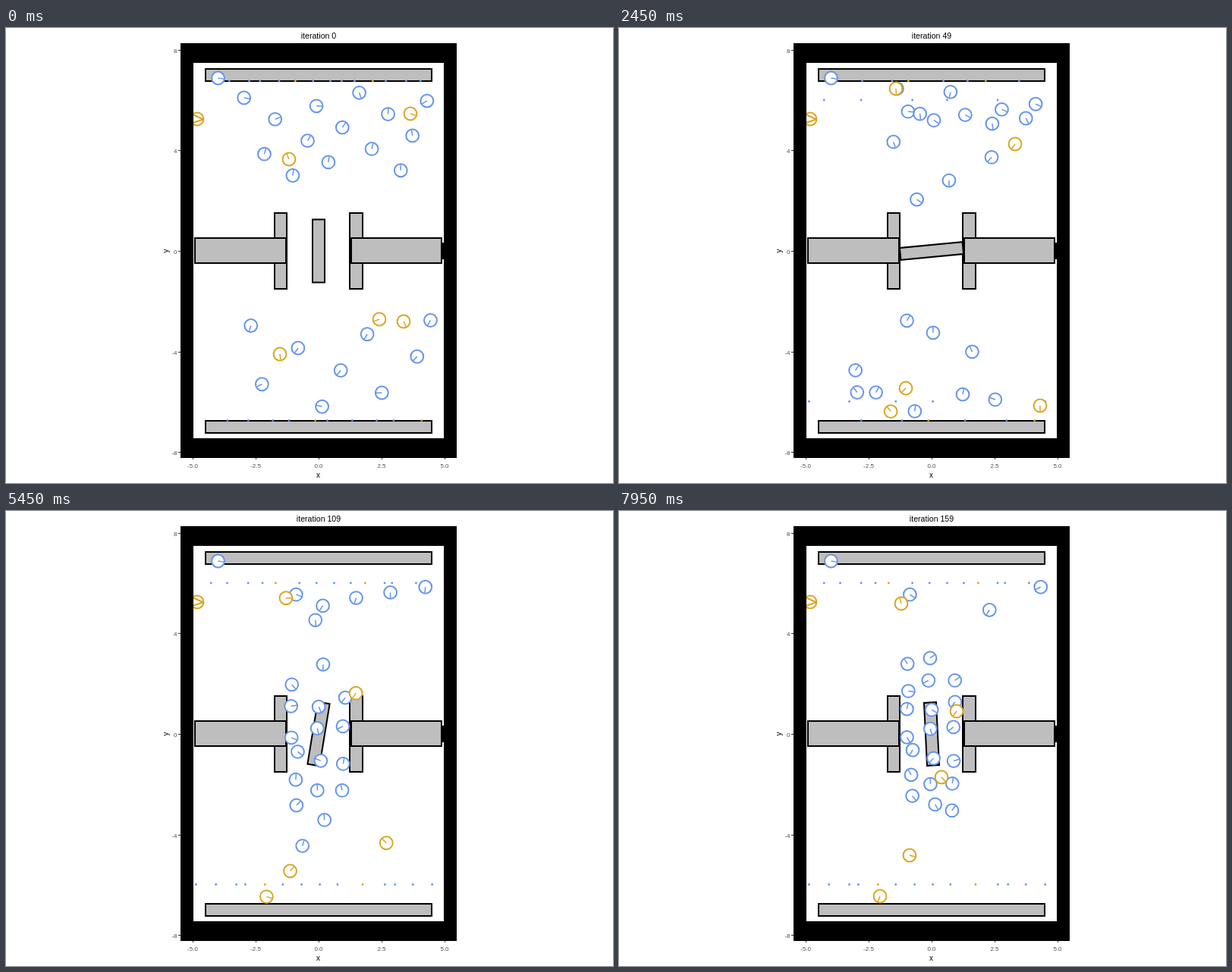
Recreate the animation shown at these times as an HTML page with a canvas. Size 800 by 600 pixels, loop 8 s.

```html
<!DOCTYPE html>
<html lang="en">
<head>
<meta charset="utf-8">
<title>Revolving door simulation</title>
<style>
  html, body { margin: 0; width: 100%; height: 100%; overflow: hidden; background: #fff; }
  canvas { display: block; }
</style>
</head>
<body>
<canvas id="stage" width="800" height="600"></canvas>
<script>
const ctx = document.getElementById('stage').getContext('2d');
const BLUE = '#6495ed', GOLD = '#daa520', GREY = '#bebebe';
const STEP = 50, STEPS = 160;
const FONT = '"Liberation Sans", Arial, sans-serif';
const DOOR = { x: 412, y: 294 };
const walkers = [], marks = [];

let seed = 7;
function random() {
  seed = (seed * 16807) % 2147483647;
  return seed / 2147483647;
}
const jitter = size => (random() * 2 - 1) * size;
const mix = (a, b, u) => a + (b - a) * u;

// Shortest way round the circle
function mixAngle(a, b, u) {
  const d = b - a;
  return a + Math.atan2(Math.sin(d), Math.cos(d)) * u;
}

// Everyone faces the next waypoint; a path is a list of [iteration, x, y].
function walk(color, ...path) {
  const points = path.map(([t, x, y], i) => {
    const [, nextX, nextY] = path[i + 1] || [0, x + jitter(1), y + jitter(1)];
    return { t, x, y, angle: Math.atan2(nextY - y, nextX - x) };
  });
  walkers.push({ color, points });
}

// Evenly staggered place number i of n inside a box
function place(i, n, [left, top, right, bottom], shift) {
  return [
    mix(left, right, (i + .5 + jitter(.3)) / n),
    mix(top, bottom, (i * .618 + shift) % 1)
  ];
}

// Start spread out, gather at one end, then leave one by one for the door.
// dir is -1 for the upper group and 1 for the lower one.
function group(n, startBox, gatherBox, pace, dir) {
  for (let i = 0; i < n; i++) {
    const rank = (i * 5 + 3) % n;
    const start = place(i, n, startBox, .1);
    const [x, y] = place(i, n, gatherBox, .4);
    const column = rank % 3, tier = Math.floor(rank / 3);
    const seatX = (column - 1) * 30 + jitter(6);
    const seatY = 13 + dir * (13 + 30 * tier + 6 * column) + jitter(5);
    const leave = 29 + pace * (rank / n) ** 2;
    const arrive = leave + Math.hypot(DOOR.x - x, DOOR.y - y) / 6;
    walk(BLUE,
      [0, ...start],
      [28, x, y],
      [leave, x + jitter(10), y],
      [arrive, DOOR.x + seatX * 1.2, DOOR.y + seatY * 1.2],
      [Math.max(STEPS, arrive + 1), DOOR.x + seatX, DOOR.y + seatY]);
  }
}

// A row of tiny marks; lifetime gives [from, to] for a share between 0 and 1.
function row(n, y, left, right, lifetime) {
  for (let i = 0; i < n; i++) {
    const [from, to] = lifetime((i * .618) % 1);
    const x = mix(left, right, (i + jitter(.3)) / (n - 1));
    marks.push({ x, y, from, to, color: i % 5 === 4 ? GOLD : BLUE });
  }
}

group(14, [310, 80, 568, 200], [340, 79, 556, 128], 190, -1);
group(9, [300, 380, 580, 505], [272, 480, 512, 509], 75, 1);

walk(GOLD, [0, 533, 113], [28, 539, 115], [49, 522, 153], [94, 466, 233], [159, 445, 264]);
walk(GOLD, [0, 373, 173], [28, 354, 131], [49, 365, 80], [76, 367, 110], [159, 372, 122]);
walk(GOLD, [0, 361, 430], [28, 370, 503], [76, 343, 509], [159, 344, 508]);
walk(GOLD, [0, 492, 384], [28, 410, 418], [49, 378, 475], [94, 372, 481], [159, 383, 454]);
walk(GOLD, [0, 524, 387], [28, 553, 446], [49, 555, 498], [94, 555, 505], [125, 444, 366], [159, 425, 351]);

const waiting = share => [0, 10 + 85 * share];
const arrived = share => [15 + 85 * share, STEPS];
row(13, 70, 298, 546, waiting);
row(10, 517.5, 291, 544, waiting);
row(13, 95, 273, 537, arrived);
row(14, 492.5, 249, 566, arrived);

// Door angle in degrees
const doorTurn = [[0, 0], [28, 24.3], [49, 84.5], [76, 112], [94, 187.7], [125, 191], [159, 177.2]];

// Index of the running segment and the share of it that has passed
function segment(times, n) {
  let i = 0;
  while (i < times.length - 2 && n >= times[i + 1]) i++;
  return [i, Math.min(1, (n - times[i]) / (times[i + 1] - times[i]))];
}

function line(x1, y1, x2, y2, color, width) {
  ctx.strokeStyle = color;
  ctx.lineWidth = width;
  ctx.beginPath();
  ctx.moveTo(x1, y1);
  ctx.lineTo(x2, y2);
  ctx.stroke();
}

function block(x, y, w, h) {
  ctx.fillStyle = GREY;
  ctx.strokeStyle = '#000';
  ctx.lineWidth = 2;
  ctx.fillRect(x, y, w, h);
  ctx.strokeRect(x, y, w, h);
}

function ring(x, y, color) {
  ctx.fillStyle = '#fff';
  ctx.strokeStyle = color;
  ctx.lineWidth = 2;
  ctx.beginPath();
  ctx.arc(x, y, 8.4, 0, 7);
  ctx.fill();
  ctx.stroke();
}

function person(x, y, angle, color) {
  ring(x, y, color);
  line(x, y, x + 7.5 * Math.cos(angle), y + 7.5 * Math.sin(angle), color, 1.5);
}

function text(s, x, y, size, color, align = 'center') {
  ctx.font = size + 'px ' + FONT;
  ctx.fillStyle = color;
  ctx.textAlign = align;
  ctx.fillText(s, x, y);
}

function axes(n) {
  text('iteration ' + n, 412, 14, 10.6, '#000');
  text('x', 411.5, 593, 10, '#000');
  ctx.save();
  ctx.translate(214, 294);
  ctx.rotate(-Math.PI / 2);
  text('y', 0, 0, 10, '#000');
  ctx.restore();
  for (let i = 0; i < 5; i++) {
    const x = 246 + 83 * i, y = Math.round(29.5 + 132.7 * i);
    line(x + .5, 566, x + .5, 569, '#333', 1);
    line(227, y - .5, 230, y - .5, '#333', 1);
    text((i * 2.5 - 5).toFixed(1), x, 580, 8, '#4d4d4d');
    text(8 - 4 * i, 225.5, y + 3, 8, '#4d4d4d', 'right');
  }
}

function building(n) {
  block(263, 54, 298, 16);
  block(263, 518, 298, 16);
  block(354, 244, 16, 100);
  block(453, 244, 17, 100);
  block(576, 284, 10, 20);
  const [i, u] = segment(doorTurn.map(key => key[0]), n);
  ctx.save();
  ctx.translate(DOOR.x, DOOR.y);
  ctx.rotate(mix(doorTurn[i][1], doorTurn[i + 1][1], u) * Math.PI / 180);
  block(-8, -41.5, 16, 83);
  ctx.restore();
  block(249, 277, 120, 33);
  block(455, 277, 119, 33);
}

function people(n) {
  person(279.5, 66, .15, BLUE);
  ring(252, 120, GOLD);
  line(246, 114, 260, 120.5, GOLD, 2);
  line(246, 125, 260, 120.5, GOLD, 2);
  for (const { color, points } of walkers) {
    const [i, u] = segment(points.map(p => p.t), n);
    const a = points[i], b = points[i + 1];
    person(mix(a.x, b.x, u), mix(a.y, b.y, u), mixAngle(a.angle, b.angle, u), color);
  }
}

function draw(n) {
  ctx.fillStyle = '#fff';
  ctx.fillRect(0, 0, 800, 600);
  axes(n);
  building(n);
  for (const m of marks) {
    if (n < m.from || n >= m.to) continue;
    ctx.fillStyle = m.color;
    ctx.beginPath();
    ctx.arc(m.x, m.y, 1.4, 0, 7);
    ctx.fill();
  }
  people(n);

  // Outer walls
  ctx.strokeStyle = '#000';
  ctx.lineWidth = 17;
  ctx.strokeRect(238.5, 28.5, 347, 530);
  ctx.fillStyle = '#000';
  ctx.fillRect(230, 20, 364, 26);
  ctx.fillRect(230, 541, 364, 26);
}

const start = performance.now();
function tick() {
  draw(Math.floor((performance.now() - start) / STEP) % STEPS);
  requestAnimationFrame(tick);
}
tick();
</script>
</body>
</html>
```
